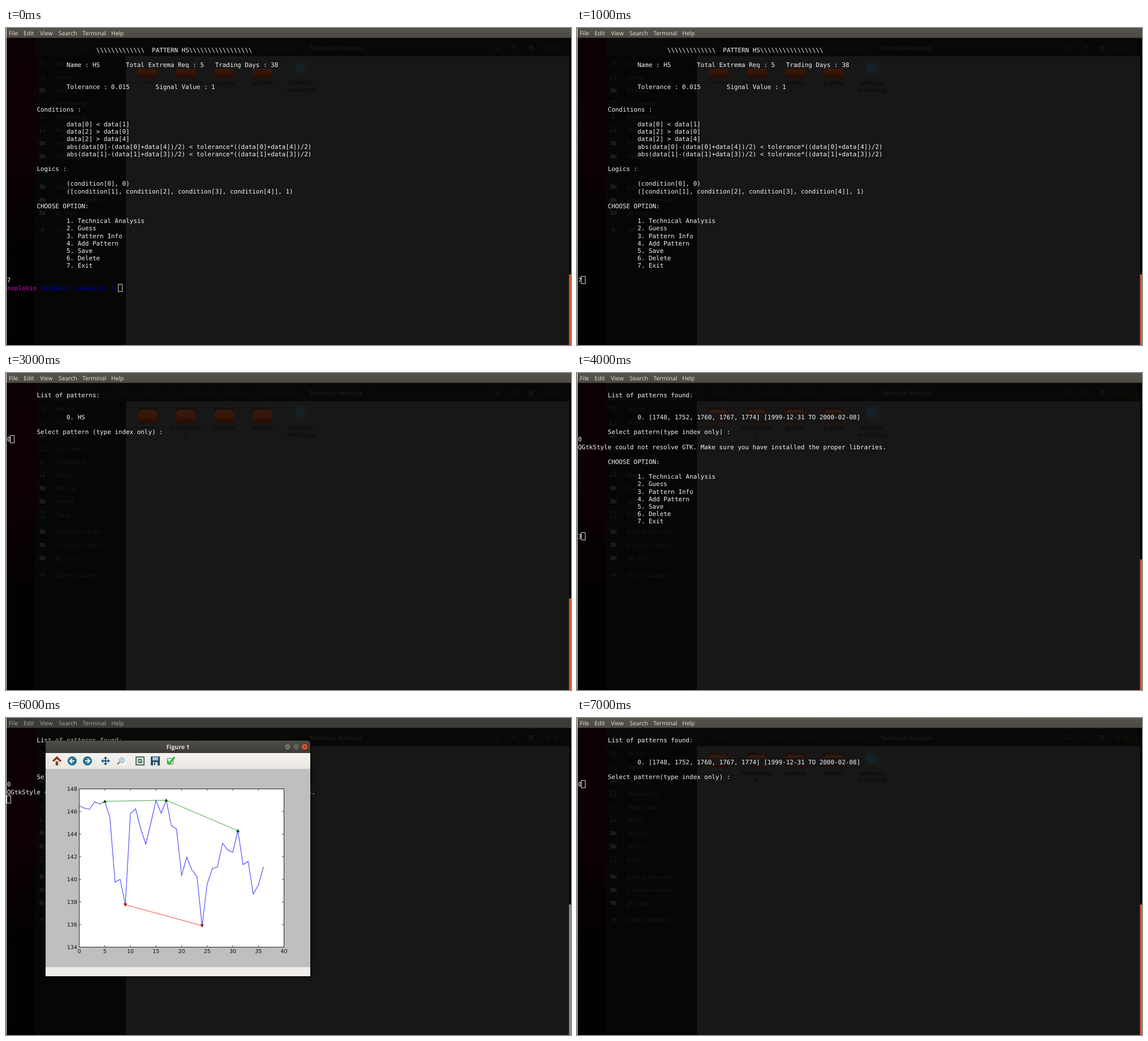
Write an HTML page with a canvas that moves like this. It is 999 px wide and 561 px high and loops after 8 s.

```html
<!DOCTYPE html>
<html>
<head>
<meta charset="utf-8">
<style>
html, body { margin: 0; width: 100%; height: 100%; overflow: hidden; background: #000; }
canvas { display: block; }
</style>
</head>
<body>
<canvas id="stage" width="999" height="561"></canvas>
<script>
const c = document.getElementById('stage').getContext('2d');
const MONO = '"DejaVu Sans Mono", monospace', SANS = '"Open Sans", "Noto Sans", sans-serif';
const CELL = 6.575, ROW = 13.16, LEFT = 1.8, TOP = 38.5;

const MENU = `        CHOOSE OPTION:

                1. Technical Analysis
                2. Guess
                3. Pattern Info
                4. Add Pattern
                5. Save
                6. Delete
                7. Exit
`;
const INFO = `                        ${'\\'.repeat(13)}  PATTERN HS${'\\'.repeat(17)}

                Name : HS       Total Extrema Req : 5   Trading Days : 38


                Tolerance : 0.015       Signal Value : 1


        Conditions :

                data[0] < data[1]
                data[2] > data[0]
                data[2] > data[4]
                abs(data[0]-(data[0]+data[4])/2) < tolerance*((data[0]+data[4])/2)
                abs(data[1]-(data[1]+data[3])/2) < tolerance*((data[1]+data[3])/2)

        Logics :

                (condition[0], 0)
                ([condition[1], condition[2], condition[3], condition[4]], 1)

${MENU}
`;
const PICK = `        List of patterns:


                0. HS

        Select pattern (type index only) :
0`;
const FOUND = `        List of patterns found:


                0. [1748, 1752, 1760, 1767, 1774] [1999-12-31 TO 2000-02-08]

        Select pattern(type index only) :
0`;
const WARNED = FOUND + '\nQGtkStyle could not resolve GTK. Make sure you have installed the proper libraries.\n';

// One scene per second; the cursor follows the last character.
const scenes = [
  { text: INFO + '7\n', bar: 436, prompt: 32 },
  { text: INFO + '7', bar: 436 },
  { text: INFO, bar: 436 },
  { text: PICK, bar: 399 },
  { text: WARNED + '\n' + MENU + '\n3', bar: 330 },
  { text: WARNED + '\n' + MENU + '\n', bar: 330 },
  { text: WARNED, bar: 330, figure: true },
  { text: FOUND, bar: 330 }
];

function rect(x, y, w, h, fill) {
  c.fillStyle = fill;
  c.fillRect(x, y, w, h);
}
function text(s, x, y, fill, font, align = 'left') {
  c.font = font;
  c.fillStyle = fill;
  c.textAlign = align;
  c.fillText(s, x, y);
}
function path(points, stroke, width = 1, fill) {
  c.beginPath();
  points.forEach(p => c.lineTo(p[0], p[1]));
  if (fill) { c.fillStyle = fill; c.fill(); }
  if (stroke) { c.strokeStyle = stroke; c.lineWidth = width; c.stroke(); }
}
function disc(x, y, r, fill, stroke) {
  c.beginPath();
  c.arc(x, y, r, 0, 7);
  if (fill) { c.fillStyle = fill; c.fill(); }
  if (stroke) { c.strokeStyle = stroke; c.lineWidth = 1; c.stroke(); }
}
function shade(y0, y1, ...colors) {
  const g = c.createLinearGradient(0, y0, 0, y1);
  colors.forEach((color, i) => g.addColorStop(i / (colors.length - 1), color));
  return g;
}

function panels() {
  rect(0, 0, 999, 561, '#030303');
  rect(1, 17, 50, 544, shade(17, 561, '#0b0006', '#0d0006', '#030003', '#020102'));
  rect(51, 17, 161, 544, '#060605');
  rect(51, 17, 945, 33, '#080807');
  rect(212, 50, 784, 511, '#171717');
}

function folder(x) {
  rect(x - 16, 61, 15, 5, '#1e0c07');
  rect(x - 17, 63, 34, 25, '#1e0c07');
  rect(x - 14, 65, 28, 3, '#2a1d17');
  rect(x - 17, 68, 34, 20, shade(68, 88, '#38180a', '#371607', '#260c03'));
}

function fileManager() {
  const dim = '#191918', faint = '#121211', font = '10.4px ' + SANS;
  const places = { Recent: 63, Home: 87, Desktop: 110, Documents: 133.5, Downloads: 157, Music: 180,
    Pictures: 203.5, Videos: 227, Trash: 250.5, 'Data-Science-Pyt…': 280.5, 'x-nautilus-deskto…': 304,
    git_repo: 327, 'Other Locations': 357 };
  Object.entries(places).forEach(([name, y], i) => {
    text(name, 88, y + 4, dim, font);
    if (!i) {
      disc(64, y, 5, null, dim);
      path([[64, y - 3], [64, y], [67, y]], dim);
    } else if (i == 1) path([[58, y], [64, y - 5], [70, y], [68, y], [68, y + 5], [60, y + 5], [60, y], [58, y]], dim);
    else if (i == 4) path([[64, y - 4], [64, y + 4], [60, y], [64, y + 4], [68, y]], dim);
    else if (i == 5) {
      path([[62, y + 3], [62, y - 4], [68, y - 4], [68, y + 2]], dim);
      disc(61, y + 3, 2, dim);
      disc(67, y + 2, 2, dim);
    } else if (i == 12) {
      rect(60, y - .5, 9, 1.5, dim);
      rect(64, y - 4, 1.5, 9, dim);
    } else if (i == 3 || i == 8) path([[60, y - 5], [68, y - 5], [68, y + 5], [60, y + 5], [60, y - 5]], dim);
    else {
      rect(59, y - 4, 5, 2, dim);
      rect(59, y - 3, 11, 7, dim);
    }
  });

  for (const [x, d] of [[67, -1], [92, 1]])
    path([[x - 2 * d, 31], [x + 2 * d, 35], [x - 2 * d, 39]], faint);
  path([[113, 37], [117, 33], [121, 37]], faint);
  path([[132, 35], [138, 30], [144, 35], [142, 35], [142, 40], [134, 40], [134, 35]], faint);
  const crumbs = { Work: 194, Intern: 239, CL: 285, Corvelunda: 313, Summer: 384, 'CL Work(Final)': 443 };
  for (const name in crumbs) text(name, crumbs[name], 38.5, faint, font);
  text('Technical Analysis', 537, 38.5, dim, 'bold 10.2px ' + SANS);
  path([[645, 33], [651, 33], [648, 37]], null, 0, faint);
  disc(866, 33.5, 3.5, null, dim);
  path([[869, 36], [872, 39]], dim, 1.5);
  for (let y = 31; y < 39; y += 3) {
    rect(924, y, 9, 1.5, dim);
    if (y < 37) { rect(894, y, 3, 2, faint); rect(899, y, 4, 2, faint); }
  }
  [957, 972, 987].forEach((x, i) => disc(x, 35, 5, i < 2 ? '#0c0c0b' : '#100906'));

  ['data', 'formatchec', 'options', 'pattern'].forEach((name, i) => {
    folder(250 + 68 * i);
    text(name, 250 + 68 * i, 100.5, '#060606', font, 'center');
  });
  text('k', 318, 112.5, '#060606', font, 'center');
  rect(509, 57, 27, 31, '#191919');
  disc(521, 71, 9, '#13212a');
  text('technical_', 522, 100.5, '#060606', font, 'center');
  text('analysis.py', 522, 112.5, '#060606', font, 'center');
}

function terminal(scene) {
  const lines = scene.text.split('\n');
  // Written cells hide the details that show through the window.
  c.save();
  c.beginPath();
  lines.forEach((line, k) => {
    const indent = line.search(/\S/);
    if (indent >= 0)
      c.rect(LEFT + indent * CELL, TOP + k * ROW - 6.5, (line.length - indent) * CELL, ROW);
  });
  c.clip();
  panels();
  c.restore();

  const put = (s, col, k, fill = '#f4f4f4', weight = '') =>
    text(s, LEFT + col * CELL, TOP + k * ROW + 4, fill, weight + '10.92px ' + MONO);
  lines.forEach((line, k) => {
    const s = line.trimStart();
    put(s, line.length - s.length, k);
  });
  let row = lines.length - 1, col = lines[row].length;
  if (scene.prompt) {
    row = scene.prompt;
    col = 30;
    put('maplekin', 0, row, '#86087f', 'bold ');
    put('Technical Analysis $', 9, row, '#00008c', 'bold ');
  }
  c.strokeStyle = '#d8d8d8';
  c.lineWidth = 1;
  c.strokeRect(Math.floor(LEFT + col * CELL - .5) + .5, Math.round(TOP + row * ROW - 7) + .5, 7, 13);
}

function menuBar(active) {
  rect(1, 0, 998, 17.5, active ? shade(0, 17, '#55524a', '#4c4a43') : '#3c3b37');
  const items = { File: 5, Edit: 31, View: 60, Search: 93, Terminal: 135, Help: 186 };
  for (const name in items)
    text(name, items[name], 13, active ? '#e6e2da' : '#aaa79f', '10.4px ' + SANS);
}

function toolIcons() {
  const y = 76;
  for (let d = -6; d <= 6; d += 3) rect(74, y + d, 1.5, 1.5, '#c8c4bc');
  rect(85, y - 1, 11, 9, '#e8dcc4');
  rect(88, y + 1, 4, 7, '#75421f');
  path([[82, y], [90, y - 8], [98, y], [96, y + 1], [90, y - 4], [84, y + 1]], '#7d2020', 1, '#a33327');
  for (const [x, d] of [[117, -1], [144, 1]]) {
    disc(x, y, 7.5, '#24789b', '#185a78');
    path([[x - 4 * d, y], [x + 3 * d, y]], '#fff', 2);
    path([[x, y - 4], [x + 4 * d, y], [x, y + 4]], '#fff', 2);
  }
  for (let i = 0; i < 4; i++) {
    c.save();
    c.translate(176, y);
    c.rotate(i * Math.PI / 2);
    path([[0, 0], [5, 0]], '#205f80', 2);
    path([[4, -3.5], [8, 0], [4, 3.5]], null, 0, '#205f80');
    c.restore();
  }
  rect(199, y - 7, 13, 14, '#fafafa');
  path([[202, y + 1], [197, y + 6]], '#b78a4c', 3);
  disc(205, y - 1, 5, '#b7d6e4', '#8aaebd');
  rect(229, y - 8, 16, 16, '#426b5e');
  rect(231, y - 6, 12, 12, '#f4f4ec');
  rect(233, y - 4, 8, 8, '#4f806c');
  path([[234, y + 2], [236, y - 1], [238, y + 1], [240, y - 3]], '#fff');
  rect(256, y - 8, 16, 16, '#294e68');
  rect(259, y - 7, 10, 6, '#a8c4d5');
  rect(260, y + 2, 8, 6, '#d8dfe4');
  rect(262, y + 3, 2, 4, '#294e68');
  c.strokeStyle = '#777';
  c.strokeRect(285.5, y - 4.5, 10, 10);
  path([[285, y], [289, y + 5], [298, y - 7]], '#1fbd20', 3);
}

const prices = [146.5, 146.3, 146.2, 146.85, 146.65, 146.9, 145.45, 139.75, 140, 137.75, 145.8, 146.25,
  144.5, 143.1, 145, 147, 145.85, 147, 144.75, 144.45, 140.35, 141.95, 140.85, 140.25, 135.9, 139.6,
  140.95, 141.1, 143.2, 142.6, 142.4, 144.3, 141.3, 141.6, 138.7, 139.5, 141.1];
const at = day => [129.5 + day * 9.05, 125.5 + (148 - prices[day]) * 20];

function trend(days, line, fill, up) {
  const points = days.map(at);
  path(points, line);
  for (const [x, y] of points)
    path([[x - 2.5, y + 2 * up], [x, y - 2.5 * up], [x + 2.5, y + 2 * up], [x - 2.5, y + 2 * up]], fill, 1, fill);
}

function figure() {
  c.save();
  c.shadowColor = '#000';
  c.shadowBlur = 8;
  c.fillStyle = shade(40, 62, '#504e48', '#3c3b37');
  c.beginPath();
  c.roundRect(70, 40, 468, 417, [5, 5, 0, 0]);
  c.fill();
  c.restore();
  text('Figure 1', 304, 55, '#e4e0d8', 'bold 10.4px ' + SANS, 'center');
  [498, 513, 528].forEach((x, i) => disc(x, 51, 5.5, i < 2 ? '#76746c' : '#e9582f', '#33322e'));
  rect(495.5, 50.5, 5, 1, '#383732');
  c.strokeStyle = '#383732';
  c.strokeRect(510.5, 48.5, 5, 5);
  path([[526, 49], [530, 53]], '#4a2015');
  path([[530, 49], [526, 53]], '#4a2015');
  rect(70, 62, 468, 28, shade(62, 90, '#f4f2ee', '#eae7e1'));
  toolIcons();
  rect(70, 90, 468, 351, '#bfbfbf');
  rect(70, 441, 468, 16, '#f0eeea');

  rect(129, 125, 362, 280, '#fff');
  path(prices.map((_, day) => at(day)), '#4040ff', 1.1);
  trend([5, 17, 31], '#40a040', '#0a5a0a', 1);
  trend([9, 24], '#ff4040', '#a01818', -1);
  c.strokeStyle = '#222';
  c.lineWidth = 1;
  c.strokeRect(129.5, 125.5, 362, 280);
  const font = '9.6px "DejaVu Sans", sans-serif';
  for (let i = 0; i <= 8; i++) {
    const x = 129.5 + i * 45.25;
    path([[x, 405], [x, 402]], '#222', .8);
    path([[x, 126], [x, 129]], '#222', .8);
    text(i * 5, x, 416, '#111', font, 'center');
  }
  for (let i = 0; i <= 7; i++) {
    const y = 125.5 + i * 40;
    path([[130, y], [133, y]], '#222', .8);
    path([[491, y], [488, y]], '#222', .8);
    text(148 - 2 * i, 126, y + 3.2, '#111', font, 'right');
  }
}

function draw(now) {
  const scene = scenes[Math.floor(now % 8000 / 1000)];
  c.textRendering = 'geometricPrecision';
  panels();
  fileManager();
  terminal(scene);
  rect(995.5, scene.bar, 3.5, 561 - scene.bar, scene.figure ? '#8f8d89' : '#d9582f');
  menuBar(!scene.figure);
  if (scene.figure) figure();
  rect(0, 0, 1, 561, '#f4f4f4');
  requestAnimationFrame(draw);
}
requestAnimationFrame(draw);
</script>
</body>
</html>
```
